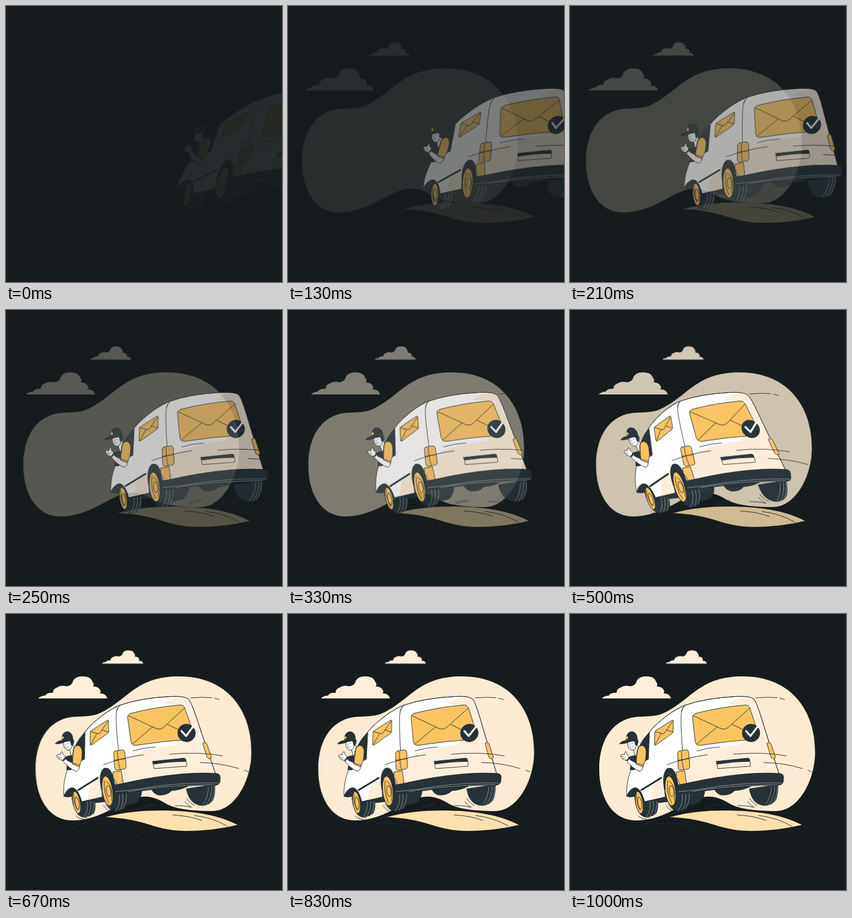
An HTML page for the animation above (1.04 s loop, 500 px wide and 500 px high).

```html
<!DOCTYPE html>
<html lang="en">
<head>
<meta charset="utf-8">
<title>Delivery van</title>
<style>
html, body { margin: 0; width: 100%; height: 100%; overflow: hidden; background: #161c1e; }
svg { display: block; width: 100%; height: 100%; }
g { transform-box: view-box; transform-origin: 250px 250px; }
path, ellipse, circle { stroke: #1c272c; stroke-width: .95; stroke-linecap: round; stroke-linejoin: round; }
.dark { fill: #263238; }
.gold { fill: #fac461; }
.white { fill: #fff; }
.cream { fill: #fdeedb; stroke: none; }
.line { fill: none; }
.faint { fill: none; stroke: #263238; stroke-width: .8; }
.tread { fill: none; stroke: #b4babd; stroke-width: .7; }
.flat { stroke: none; }
</style>
</head>
<body>
<svg viewBox="0 0 500 500">
  <g id="sky">
    <path class="flat" fill="#fbebd2" d="M53 282C53 225 80 187 128 186C158 185 165 184 190 168C225 145 245 113 313 113C400 113 444 174 444 250C444 300 415 357 373 357C330 357 305 352 290 344C262 327 243 327 215 341C190 353 160 374 120 374C75 374 53 330 53 282Z"/>
    <path id="cloud" class="flat" fill="#fdefda" d="M58 153Q62 148 70 148Q74 142 84 143Q85 135 92 133Q99 128 109 131Q119 130 121 121Q126 112 139 113Q153 113 156 123Q160 127 157 131Q168 132 170 138Q172 142 169 144Q180 143 183 153Z"/>
    <use href="#cloud" transform="translate(138.2 -1.8) scale(.6)"/>
  </g>

  <g id="ground">
    <path class="flat" fill="#fce0ae" d="M180 368C215 359 245 356 280 356C340 356 385 364 420 382C390 389 360 393 326 393C265 392 258 371 180 368Z"/>
    <path class="line" d="M303 364Q335 366 355 374M342 365Q375 369 401 384"/>
    <path class="faint" d="M80 414Q123 378 188 366M160 380Q212 372 259 402M217 391Q235 397 250 411M420 382Q438 389 453 402"/>
  </g>

  <g id="van">
    <!-- underside and far wheel -->
    <path class="dark" d="M262 317L335 308Q318 319 298 320Q290 329 274 328Q264 325 262 317Z"/>
    <path class="dark" d="M212 322L244 317Q245 331 234 342L212 348Z"/>
    <path class="dark" d="M325 317C329 338 338 346 354 347Q369 345 373 336Q377 326 377 309Z"/>
    <path class="tread" d="M376 312Q376 331 366 344M371 312Q371 332 360 346M365 313Q365 330 354 346"/>
    <path class="dark" d="M130 334L200 318L190 338Q170 341 158 342Z"/>

    <!-- near tyres -->
    <path class="dark" d="M117 316Q128 314 136 334L158 338Q161 350 156 361Q147 369 134 367Q119 360 117 330Z"/>
    <path class="tread" d="M145 340Q147 355 139 367M151 339Q153 354 145 366M157 339Q158 353 152 364"/>
    <path class="dark" d="M174 292Q190 286 197 322L217 323Q220 341 211 351Q202 358 191 357Q174 345 172 315Z"/>
    <path class="tread" d="M203 325Q206 343 196 357M209 324Q212 343 203 356M216 324Q218 340 209 353"/>

    <!-- body -->
    <path class="white" d="M103 330C101 312 106 293 112 278L131 235Q141 213 160 197Q182 177 206 166Q246 152 300 149.500Q326 148 333 154Q338 160 346 186L379 291L290 297L196 309L190 296Q185 281 176 284Q169 291 172 331L135 340Q129 317 119 315Q113 319 116 329Z"/>
    <path class="cream" d="M287 163Q301 152 323 150Q333 151 337 162L378 290L290 297L211 306L211 264Q242 245 310 236L328 166Z"/>
    <path class="cream" d="M146 337C146 316 154 299 171 290Q169 306 172 331Z"/>
    <path class="line" d="M131 235Q141 213 160 197Q182 177 206 166Q246 152 300 149.500Q326 148 333 154Q338 160 346 186L379 291M207 167Q201 174 201 188Q201 222 207 282M202 177Q203 169 208 167"/>
    <path class="dark" d="M103 330Q107 318 116 315Q127 312 135 340Q126 318 119 318Q114 323 117 330Q109 333 103 330Z"/>
    <path class="dark" d="M171 318Q166 289 176 280Q188 275 193 296L199 323L193 322Q190 292 180 290Q173 294 175 321Z"/>
    <path class="line" style="stroke-width:3" d="M129 319L165 297"/>

    <!-- hubs -->
    <ellipse class="gold" cx="125.500" cy="341.500" rx="6.500" ry="20" transform="rotate(-9 125.500 341.500)"/>
    <ellipse class="line" cx="126.500" cy="342.500" rx="3.500" ry="11" transform="rotate(-9 126.500 342.500)"/>
    <path class="line" d="M121 326Q119 341 127 356"/>
    <ellipse class="gold" cx="182" cy="320.500" rx="9.300" ry="27" transform="rotate(-7 182 320.500)"/>
    <ellipse class="line" cx="184" cy="321" rx="4" ry="10" transform="rotate(-7 184 321)"/>
    <path class="line" d="M177 302Q174 324 184 342M180 303Q193 311 189 338"/>

    <!-- side mail -->
    <path class="gold" d="M156 211L184 193Q187 191 187 195L187 212Q187 215 184 217L156 237Q153 239 153 235L153.500 215Q154 212 156 211Z"/>
    <path class="line" d="M154 213L168 217Q171 217 173 213L187 193M154 237L165 217M187 214L175 210"/>

    <!-- back window mail -->
    <path class="gold" d="M228 180Q270 169 316 165Q324 164 326 171L342 219Q343 226 336 227Q286 230 235 238Q229 238 227 232L222 188Q222 182 228 180Z"/>
    <path class="line" d="M223 184L272 207Q280 211 287 205L326 170M229 236L267 204M341 223L294 200"/>
    <circle class="dark" cx="328" cy="215.500" r="16"/>
    <path class="line" style="stroke:#fff;stroke-width:3.400" d="M319 212L327 221L340 204"/>

    <!-- lights and plate -->
    <path class="gold" d="M193 286L208 284L211 307L199 309Q196 300 193 296Z"/>
    <path class="gold" d="M199 248L211 246Q214 246 215 250L217 276Q217 280 213 281L200 283Q196 283 196 278L195 252Q195 249 199 248Z"/>
    <path class="line" d="M202 249Q202 267 206 282M196 265L216 262"/>
    <path class="gold" d="M357 234Q362 231 364 235L372 259Q372 263 367 262Q364 261 363 256Z"/>
    <path class="line" d="M266 269L325 262L327 274Q327 276 324 276L268 280Z"/>
    <path class="dark" d="M265 267L323 261L326 267Q296 267 267 272Z"/>

    <!-- bumper -->
    <path class="dark" d="M194 311Q240 299 292 292.500Q345 286 381 289Q387 290 387 296L386 305Q384 310 377 310Q322 310 270 317L202 326Q196 326 193 319Z"/>
    <path class="tread" d="M196 322Q232 319 270 312Q326 305 384 306M220 322Q276 311 376 309"/>

    <!-- driver -->
    <path class="dark" d="M126 239Q134 223 144 215L142 263L132 268Z"/>
    <path class="dark" d="M110 258L119 256L121 280Q114 284 109 282Q112 268 108 260Z"/>
    <path class="white" d="M113 238L121 236L125 243L119 258Z"/>
    <path class="white" d="M104 232L120 229Q122 241 116 246Q110 248 106 242Q104 238 104 232Z"/>
    <path class="dark" d="M117 230L123 228Q124 234 121 238Q118 239 118 234Z"/>
    <path class="dark" d="M90 235Q93 230 102 229Q101 214 112 213Q122 214 122 229Q111 229 104 233Q96 236 90 235Z"/>
    <ellipse class="gold flat" cx="103.500" cy="224" rx="1.800" ry="2.600"/>
    <path class="line" style="stroke-width:.6" d="M106 236L107.500 235M111.500 235L113 234.500M109 236L108.500 239M108 241.500Q111.500 243 114 240"/>
    <path class="white" d="M120 270L110 265L105 260L101 264Q113 280 126 285Q132 284 133 273Z"/>
    <path class="white" d="M92 257Q93 253 98 255L100 250Q103 248 103 254L107 258Q107 263 102 265Q94 264 92 257Z"/>
    <path class="line" style="stroke-width:.6" d="M94 259L98 258M95 262L100 260"/>
    <path class="line" style="stroke-width:2.500" d="M104 265L108 260"/>
    <path class="gold" d="M122 250Q123 239 130 238Q137 239 138 249L137 263L132 277L120 272Z"/>
    <path class="line" d="M120 270L133 274M125 240Q122 241 121 252M138 241L142 241"/>

    <!-- speed lines -->
    <path class="line" d="M230 248Q250 242 271 241M176 273Q211 260 249 255M296 254Q350 249 392 257M351 269Q390 270 421 280M337 152Q357 150 375 151.500M380 152.500L389 155M431 283L439 286"/>
    <path class="line" d="M322 340Q327 347 334 350M325 334Q331 343 339 347M304 347Q320 347 332 350M124 366Q129 371 139 372M127 363Q134 369 144 369M174 347Q179 355 187 358M178 345Q183 353 190 356"/>
    <path class="faint" d="M244 352Q256 347 269 346M246 348L267 344"/>
  </g>
</svg>
<script>
const LOOP = 1040, FPS = 24, LEAD = 25, STRIDE = 42.5;

function move(id, steps, easing) {
  const anim = document.getElementById(id).animate(steps, { duration: 1000, fill: "both", easing });
  anim.pause();
  return anim;
}

const slide = from => [
  { transform: `translateX(${from}px)`, opacity: 0 },
  { transform: "translateX(0px)", opacity: 1 }
];

const pose = (offset, x, skew, opacity) =>
  ({ offset, transform: `translateX(${x}px) skewX(${skew}deg)`, opacity, easing: "ease-out" });

const bounce = "cubic-bezier(.36, -.01, .5, 1.38)";
const parts = [
  move("sky", slide(-30), bounce),
  move("ground", slide(30), bounce),
  move("van", [pose(0, 250, -20, 0), pose(.6, 0, 10, 1), pose(.8, 0, -2, 1), pose(1, 0, 0, 1)], "linear")
];

// The picture changes 24 times a second; each change advances the motion by one stride.
function draw() {
  const step = Math.floor(performance.now() % LOOP * FPS / 1000 + .1);
  const time = Math.min(1000, LEAD + step * STRIDE);
  for (const part of parts) part.currentTime = time;
  requestAnimationFrame(draw);
}
draw();
</script>
</body>
</html>
```
